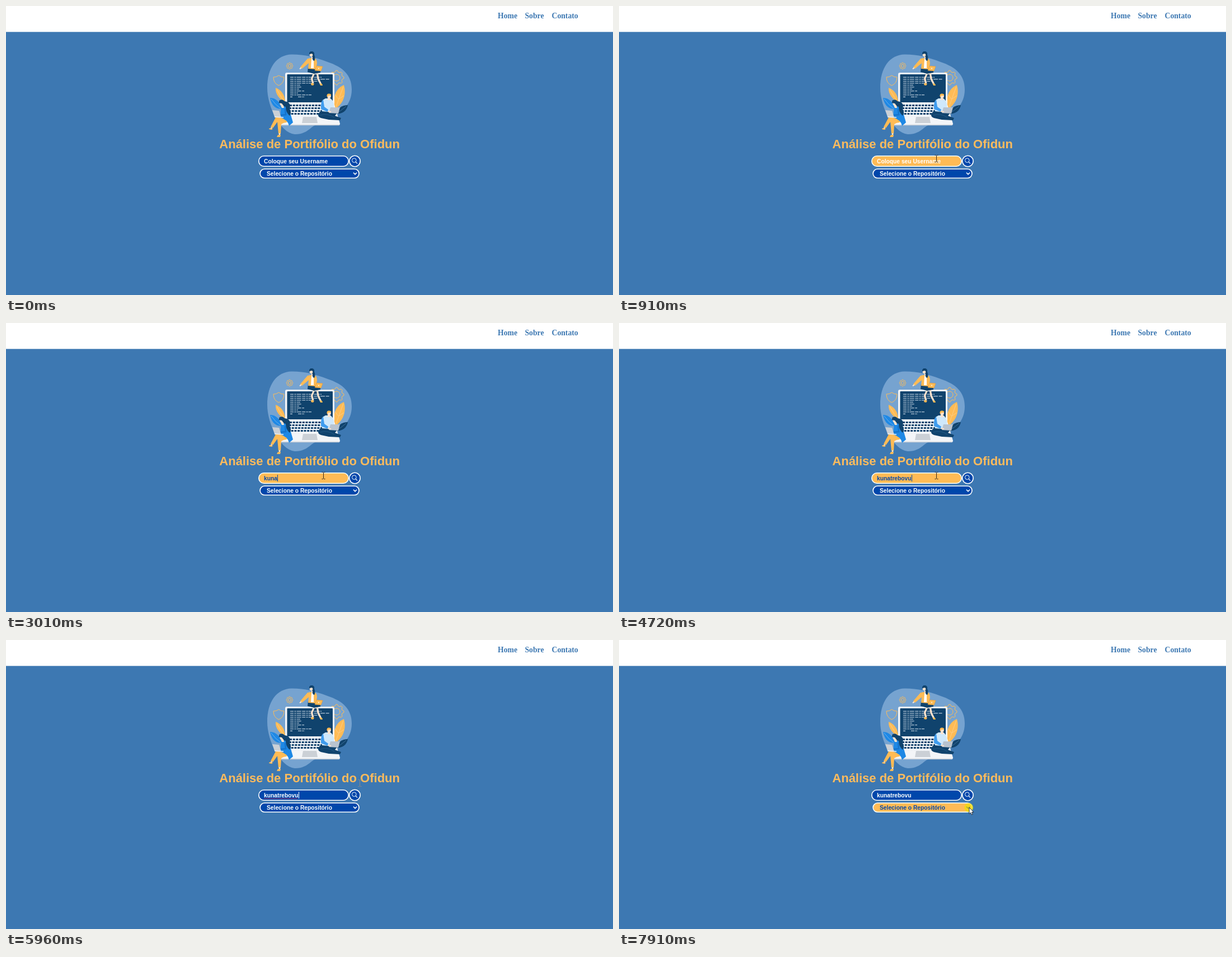
Write an HTML page with a canvas that moves like this. It is 1085 px wide and 516 px high and loops after 8000 ms.

```html
<!DOCTYPE html>
<html lang="pt">
<head>
<meta charset="utf-8">
<title>Análise de Portifólio</title>
<style>
html, body { margin: 0; width: 100%; height: 100%; overflow: hidden; background: #3d78b2; }
canvas { display: block; }
</style>
</head>
<body>
<canvas id="stage" width="1085" height="516"></canvas>
<script>
const ctx = document.getElementById('stage').getContext('2d');
const LOOP = 8000;
const BG = '#3d78b2', COBALT = '#0047ab', ORANGE = '#ffbb55', NAVY = '#10436d';
const SKY = '#1e88e5', SKIN = '#fde3cf', PALE = '#f3f5f8', GRAY = '#cbd0d6';
const SANS = '"Liberation Sans", Arial, sans-serif';
const SERIF = '"Liberation Serif", "Times New Roman", serif';
const FORM_FONT = `bold 10.27px ${SANS}`;

const USER = 'kunatrebovu';
const KEY_TIMES = [2240, 2550, 2780, 3010, 3330, 3530, 3740, 3940, 4250, 4490, 4720];
const FOCUS = 1140, BLUR = 6460, SPELL = 5360, BLINK = 550, TICK = 92;
const CLICKS = [[1140, 1310], [6460, 6640], [7910, 8000]];

// pointer stops: time, x, y
const STOPS = [
  [70, 869, 425], [350, 780, 360], [620, 640, 289], [820, 572, 268], [910, 567, 272],
  [5178, 567, 272], [5360, 592, 269], [5640, 699, 276], [5960, 632, 255],
  [6280, 632, 271], [6370, 631, 276], [6980, 631, 276], [7070, 632.5, 274],
  [7200, 640, 285], [7370, 629, 298], [7438, 629, 298], [7530, 627, 299],
  [7818, 627, 299], [7910, 626, 299]
];

function fill(d, color) {
  ctx.fillStyle = color;
  ctx.fill(new Path2D(d));
}

function line(d, color, width = 1) {
  ctx.strokeStyle = color;
  ctx.lineWidth = width;
  ctx.stroke(new Path2D(d));
}

function disc(x, y, r, color) {
  ctx.fillStyle = color;
  ctx.beginPath();
  ctx.arc(x, y, r, 0, Math.PI * 2);
  ctx.fill();
}

function ring(x, y, r, color, width) {
  ctx.strokeStyle = color;
  ctx.lineWidth = width;
  ctx.beginPath();
  ctx.arc(x, y, r, 0, Math.PI * 2);
  ctx.stroke();
}

function box(x, y, w, h, r, color) {
  ctx.fillStyle = color;
  ctx.beginPath();
  ctx.roundRect(x, y, w, h, r);
  ctx.fill();
}

function text(s, x, y, font, color) {
  ctx.font = font;
  ctx.fillStyle = color;
  ctx.fillText(s, x, y);
}

function gear(x, y, r, teeth, hole) {
  ctx.beginPath();
  for (let i = 0; i < teeth * 4; i++) {
    const a = (i - 0.5) / (teeth * 4) * Math.PI * 2;
    const d = i % 4 < 2 ? r : r * 0.8;
    ctx.lineTo(x + d * Math.cos(a), y + d * Math.sin(a));
  }
  ctx.closePath();
  ctx.strokeStyle = ORANGE;
  ctx.lineWidth = 1;
  ctx.stroke();
  ring(x, y, hole, ORANGE, 1);
}

function drawBackdrop() {
  fill('M467 146C467 111 483 87 511 86.5C536 87 551 91 575 100C602 109 618 123 618 149C618 176 600 190 581 203C570 209 556 209 546 217C537 225 528 229.500 516 229C490 226 467 180 467 146Z', '#76a3d0');
  gear(507, 107, 5.8, 8, 2.6);
  gear(591, 128, 13, 8, 6);
  line('M487.500 124Q492 127.500 497 127Q497 138 487.500 142Q478 138 478 127Q483 127.500 487.500 124Z', ORANGE);
  fill('M499 172C489 167 481 157 482 146C490 149 499 157 499 172Z', ORANGE);
  line('M484 149Q490 160 498 171', '#f7d9a5', 0.6);
  fill('M588 181C583 169 587 148 604 141C608 155 605 171 591 182Z', ORANGE);
  line('M603 144Q596 162 590 180M594 166L588 158M595 166L604 160', '#f7d9a5', 0.6);
  fill('M591 191C593 183 600 177 611 177C609 187 602 192 591 193Z', NAVY);
  line('M592 191Q600 186 608 179', '#5b8db9', 0.6);
}

function drawLaptop() {
  box(499, 119, 88, 57, 3, PALE);
  box(502.5, 122, 81.5, 50, 1, NAVY);
  fill('M500 173L586 173L597 210Q597 213 594 213L488 213Z', PALE);
  line('M488 212.5H595.500', GRAY, 1.4);

  const rows = [56, 70, 52, 40, 18, 21, 16, 25, 14, 38, 4];
  ctx.setLineDash([6, 1.4, 3, 1.2, 8, 1.6]);
  rows.forEach((w, i) => line(`M508 ${127.3 + i * 3.5}h${w}`, '#dce7f1', 1.1));
  line('M522 162.3h12', '#dce7f1', 1.1);
  for (let i = 0; i < 4; i++) {
    ctx.setLineDash([4, 1.7]);
    line(`M${507 - i} ${177.5 + i * 5}H${573 + i * 2}`, NAVY, 2.8);
  }
  ctx.setLineDash([]);
  fill('M531 198H555L557 209H529Z', GRAY);
}

function drawTopWoman() {
  line('M552 117L546.500 130L549 138M556 118L558 130L563 140', SKIN, 3.2);
  fill('M546 137L551 139L549 142L545 141ZM561 138L565 139L566 142L562 142Z', ORANGE);
  fill('M540 109L554 110Q563 114 562 119L551 121L539 118Z', NAVY);
  fill('M539 94L549 92Q556 94 556 102L554 113L540 112L541 102L529 112L526 109Z', ORANGE);
  fill('M546 95L550 95L550 111L545 111Z', '#fff');
  line('M528 110L525 112.500', SKIN, 2);
  fill('M546 89H549L550 95H546Z', SKIN);
  fill('M542 86Q542 81 547 81Q552 82 551 87Q554 94 551 98Q547 97 548 91Z', NAVY);
  disc(545.5, 87.5, 2.8, SKIN);
  fill('M542 86Q542 80.500 547 81Q551 82 551 88L547 85Z', NAVY);
  fill('M555 107L566 108L563 116L552 115Z', ORANGE);
  line('M555 107L566 108L563 116L552 115Z', '#e59a36', 0.7);
  disc(559, 111.5, 0.9, '#fff');
}

function drawMan() {
  fill('M565 184L558 193Q557 198 563 200L577 203L597 204L599 200L588 196L592 191L586 186Z', NAVY);
  line('M562 195Q575 191 587 199', '#2a628f', 0.8);
  fill('M571 165L580 165Q586 169 586 178L586 190L565 188Q561 176 566 168Z', '#cfe8fb');
  fill('M567 167Q562 171 563 184L575 189L576 185L569 180Z', '#3f9cee');
  fill('M575 162H579L580 168H575Z', SKIN);
  disc(577.5, 161, 3.4, SKIN);
  fill('M573.500 161Q573 156 578 156.500Q582 157 581 160L576 160L575 163Z', ORANGE);
  fill('M580 181L597 181L594 192L577 191Z', '#b8c3cf');
  line('M575 188L581 189', SKIN, 2);
}

function drawLeftWoman() {
  fill('M492 184C480 184 474 175 472 164C483 164 491 173 493 184Z', SKY);
  line('M474 166Q482 177 491 183', '#9fcdf5', 0.6);
  fill('M483 197L507 199Q507 208 496 209L492 211L491 228L487 228L485 207L477 218L473 216Z', ORANGE);
  line('M475 217L473 220', SKIN, 2.4);
  line('M489 227V231', SKIN, 2.4);
  fill('M471 218L477 219L475 221L470 220ZM486 230L491 230L490 234L484 234Z', ORANGE);
  fill('M492 178L503 178Q509 184 509 194L513 208L506 214Q504 203 490 199Z', SKY);
  fill('M488 169Q494 165 498 170Q507 171 508 178L507 184Q511 191 507 196Q500 190 500 180L493 178Z', NAVY);
  fill('M491 177H496L497 182L493 182Z', SKIN);
  disc(492.5, 174.5, 3, SKIN);
  fill('M487.500 173Q489 166 496 169L497 179L493 174Z', NAVY);
  line('M499 184L500 194L490 195', '#1674cc', 2.6);
  fill('M476 186L488 187L492 199L480 198Z', GRAY);
  line('M480 198L496 199', '#eef1f4', 1.4);
}

function drawPage() {
  ctx.fillStyle = BG;
  ctx.fillRect(0, 0, 1085, 516);
  ctx.fillStyle = '#fff';
  ctx.fillRect(0, 0, 1085, 46.3);
  const nav = `bold 13.7px ${SERIF}`;
  text('Home', 879, 22, nav, BG);
  text('Sobre', 927.5, 22, nav, BG);
  text('Contato', 975.5, 22, nav, BG);
  drawBackdrop();
  drawLaptop();
  drawTopWoman();
  drawMan();
  drawLeftWoman();
  text('Análise de Portifólio do Ofidun', 381.3, 254, `bold 22px ${SANS}`, '#fdbb5d');
}

function pointerAt(t) {
  if (t < STOPS[0][0]) return null;
  let i = STOPS.length - 1;
  while (STOPS[i][0] > t) i--;
  const [t0, x0, y0] = STOPS[i];
  const [t1, x1, y1] = STOPS[i + 1] || [LOOP, x0, y0];
  const k = Math.floor((t - t0) / TICK) * TICK / (t1 - t0);
  return { x: x0 + (x1 - x0) * k, y: y0 + (y1 - y0) * k };
}

function targetOf(p) {
  if (!p) return '';
  const inside = (x0, y0, x1, y1) => p.x >= x0 && p.x <= x1 && p.y >= y0 && p.y <= y1;
  if (Math.hypot(p.x - 623.5, p.y - 277) < 10.5) return 'button';
  if (inside(451, 267, 613, 287)) return 'field';
  if (inside(453, 290, 632, 308)) return 'select';
  if (inside(382, 236, 703, 262)) return 'title';
  return '';
}

function drawField(t, hot) {
  box(451, 267, 162, 20, 10, '#fff');
  box(452.6, 268.6, 158.8, 16.8, 8.4, hot ? ORANGE : COBALT);
  const typed = KEY_TIMES.filter(k => k <= t);
  const value = USER.slice(0, typed.length);
  const ink = hot ? COBALT : '#fff';
  if (value) text(value, 461, 281, FORM_FONT, ink);
  else text('Coloque seu Username', 461, 281, FORM_FONT, '#fff');

  if (t < FOCUS || t >= BLUR) return;
  const width = ctx.measureText(value).width;
  if (t >= SPELL) {
    let wave = 'M461 283';
    for (let x = 0; x < width - 2; x += 3) wave += 'q.75 -1 1.500 0t1.500 0';
    line(wave, '#c8305a', 1);
  }
  const since = t - (typed.length ? typed[typed.length - 1] : FOCUS);
  if (since % (2 * BLINK) < BLINK) {
    ctx.fillStyle = ink;
    ctx.fillRect(Math.round(461 + width), 271, 1, 12);
  }
}

function drawButton(hot) {
  disc(623.5, 277, 10.5, '#fff');
  disc(623.5, 277, 8.9, hot ? ORANGE : COBALT);
  ring(622.3, 275.6, 3.8, '#fff', 1);
  line('M625.200 278.500L628 281.300', '#fff', 1.1);
}

function drawSelect(hot) {
  const ink = hot ? COBALT : '#fff';
  box(453.3, 290.2, 178.5, 17.8, 8.9, '#fff');
  box(454.9, 291.8, 175.3, 14.6, 7.3, hot ? ORANGE : COBALT);
  text('Selecione o Repositório', 466, 303, FORM_FONT, ink);
  line('M621 297.500L624 300.500L627 297.500', ink, 1.6);
}

function drawPointer(p, target) {
  ctx.save();
  ctx.translate(p.x, p.y);
  ctx.lineJoin = 'round';
  if (target === 'field' || target === 'title') {
    const ink = target === 'field' ? '#33281a' : '#8f8a84';
    line('M-2.500 -5.500H-.500L.5 -4.500L1.500 -5.500H3.500M.5 -5V6M-2.500 6.500H-.500L.5 5.500L1.500 6.500H3.500', ink, 1);
  } else {
    const shape = target === 'button'
      ? 'M-1.300 1Q0 -1 1.300 1V5.500Q6.800 5.500 7 8.500L6.500 12.500L5 16H-1L-4.500 10Q-4.300 8 -1.300 10Z'
      : 'M0 0V11.500L2.600 9.200L4.300 13L6.200 12.200L4.600 8.400H8Z';
    fill(shape, '#fff');
    line(shape, '#16202c', 0.9);
    if (target === 'button') line('M1.300 6V9M3.300 6.200V9M5.200 6.800V9', '#16202c', 0.7);
  }
  ctx.restore();
}

function draw(t) {
  const p = pointerAt(t);
  const target = targetOf(p);
  drawPage();
  drawField(t, target === 'field');
  drawButton(target === 'button');
  drawSelect(target === 'select');
  if (!p) return;
  if (CLICKS.some(([a, b]) => t >= a && t < b)) {
    disc(p.x - 0.8, p.y + 0.2, 8, 'rgba(240,224,0,0.68)');
  }
  drawPointer(p, target);
}

const start = performance.now();
function tick() {
  draw((performance.now() - start) % LOOP);
  requestAnimationFrame(tick);
}
tick();
</script>
</body>
</html>
```
